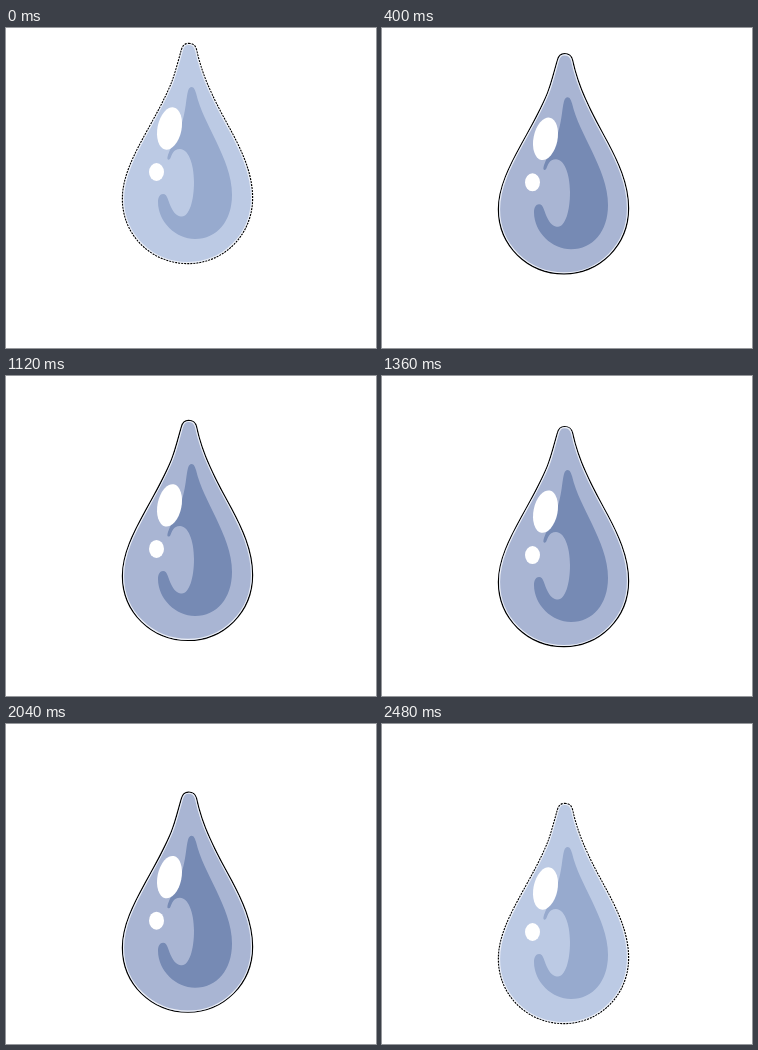
An HTML page with a canvas that plays this animation: 370x320 px, repeating every 2520 ms.

```html
<!DOCTYPE html>
<html lang="en">
<head>
<meta charset="utf-8">
<title>Falling drop</title>
<style>
  html, body { margin: 0; width: 100%; height: 100%; overflow: hidden; background: #fff; }
  canvas { display: block; }
</style>
</head>
<body>
<canvas id="stage" width="370" height="320"></canvas>
<script>
const ctx = document.getElementById('stage').getContext('2d');
const LOOP = 2520, STEP = 40, LAST = LOOP / STEP - 1, FALL = 64;

const body = new Path2D(`M182.5 16
  C187 16 189 18 190 22 C193 36 198 50 203 61
  C210 77 218 91 225 104 C235 123 246 145 246 170
  C246 207 217 235 182 235 C146 235 117 207 117 171
  C117 149 128 128 140 106 C150 88 160 70 166 55
  C170 45 173 32 176 22 C177 18 179 16 182.5 16 Z`);

const shade = new Path2D(`M185.5 59
  C188 59 189 62 190 65 C194 82 202 96 210 113
  C218 130 226 148 226 167 C226 193 211 211 189 211
  C170 211 152 194 152 174 C152 169 154 166 157 166
  C162 166 162 174 166 181 C169 187 173 188.500 176 188.500
  C183 188.500 188 173 188 154 C188 135 182 121 174 121
  C167 121 166 127 164 131 C161 133 161 130 162 127
  C166 116 174 104 177 91 C180 80 180 71 182 63
  C183 60 184 59 185.5 59 Z`);

const soft = { body: '#bccae4', shade: '#97aace', dash: [2, 1] };
const deep = { body: '#a9b5d3', shade: '#768ab4', dash: [] };

function outline(color, width, dash) {
  ctx.strokeStyle = color;
  ctx.lineWidth = width;
  ctx.setLineDash(dash);
  ctx.stroke(body);
}

function glint(x, y, rx, ry, tilt) {
  ctx.fillStyle = '#fff';
  ctx.beginPath();
  ctx.ellipse(x, y, rx, ry, tilt, 0, Math.PI * 2);
  ctx.fill();
}

function draw(ms) {
  const step = Math.floor((ms % LOOP) / STEP);
  const look = step === 0 || step === LAST ? soft : deep;
  ctx.fillStyle = '#fff';
  ctx.fillRect(0, 0, 370, 320);
  ctx.save();
  ctx.translate(0, step * FALL / LAST);

  // black rim, with a pale edge just inside it
  outline('#000', 2.4, look.dash);
  ctx.fillStyle = look.body;
  ctx.fill(body);
  ctx.save();
  ctx.clip(body);
  outline('#eef1f8', 2.2, []);
  ctx.restore();

  ctx.fillStyle = look.shade;
  ctx.fill(shade);
  glint(163.5, 100.5, 12, 21.5, 0.2);
  glint(150.5, 144, 7.5, 9, 0);
  ctx.restore();
}

const start = performance.now();
function tick() {
  draw(performance.now() - start);
  requestAnimationFrame(tick);
}
tick();
</script>
</body>
</html>
```
